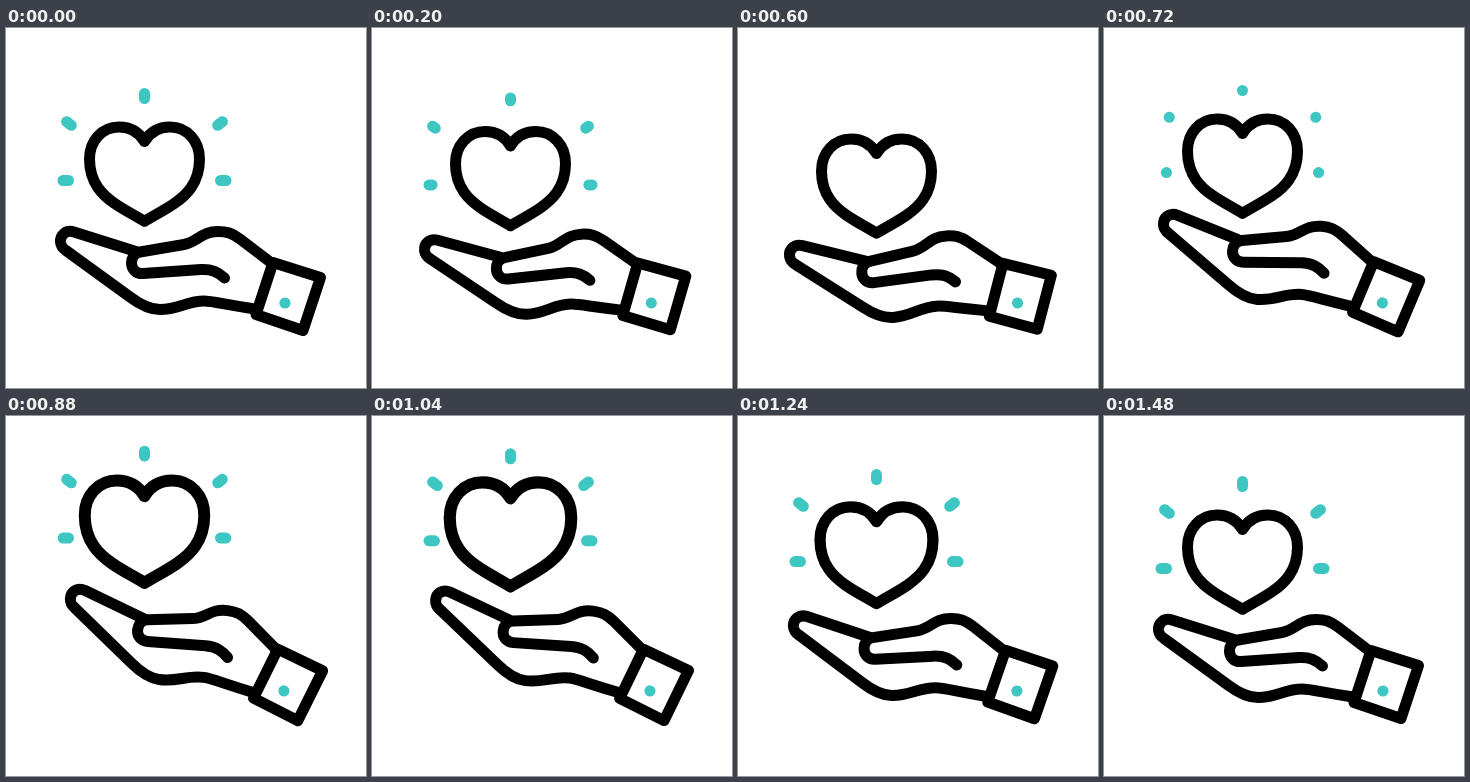
Animation, 360 px wide and 360 px high, one loop 1.52 s. Source, as an HTML page:

```html
<!DOCTYPE html>
<html lang="en">
<head>
<meta charset="utf-8">
<title>Caring hand</title>
<style>
  html, body { margin: 0; width: 100%; height: 100%; overflow: hidden; background: #fff; }
  svg { display: block; width: 100%; height: 100%; }
  .ink, .ray { fill: none; stroke-width: 11; stroke-linecap: round; stroke-linejoin: round; }
  .ink { stroke: #000; }
  .ray { stroke: #3ec6c3; }
</style>
</head>
<body>
<svg viewBox="0 0 360 360">
  <g id="hand">
    <path class="ink" d="M265.5 235 L234 211 C226 205 221 203.5 212 203.5 C195 203.5 192 214 178 216.5
      L134 224 C128 225 125.5 230 125.5 235 C125.5 241 130 246 137 245.5
      L195 241.5 C206 241 212 244 218.5 250"/>
    <path class="ink" d="M130 223.5 L68 204 C60 201.5 54 207 54.5 214 C55 219 57 220.5 60 222.5
      L124 269 C134 276.5 143 281.5 154 281.5 C172 281.5 181 273 198 273 C206 273 214 275.5 249 281"/>
    <path class="ink" d="M267 234.5 L314.5 249.5 L297 302.5 L250 286.5 Z"/>
    <circle cx="279" cy="275" r="5.6" fill="#3ec6c3"/>
  </g>
  <g id="lift">
    <path id="heart" class="ink" d="M138.5 113.5 C133 104 124 99 113 99 C96 99 83.5 113 83.5 131
      C83.5 156 98 168 108 175 C118 182 130 188 138.5 193.3
      C147 188 159 182 169 175 C179 168 193.5 156 193.5 131
      C193.5 113 181 99 164 99 C153 99 144 104 138.5 113.5 Z"/>
    <g id="rays"></g>
  </g>
</svg>
<script>
const LOOP = 1520, STEP = 40, MID = 138.5;
const $ = id => document.getElementById(id);
const hand = $('hand'), lift = $('lift'), heart = $('heart'), rays = $('rays');

// inner x, y, outer x, y; the side rays are mirrored around MID
const left = [[62.5, 152.5, 57, 152.5], [65.3, 97.3, 60.6, 93.7]];
const lines = [
  [MID, 70.5, MID, 65.5],
  ...left,
  ...left.map(([a, b, c, d]) => [2 * MID - a, b, 2 * MID - c, d])
].map(pts => {
  const el = document.createElementNS('http://www.w3.org/2000/svg', 'path');
  el.setAttribute('class', 'ray');
  rays.appendChild(el);
  return { el, pts };
});

// smooth 0..1 between two times
function ease(t, from, to) {
  const p = Math.min(1, Math.max(0, (t - from) / (to - from)));
  return (1 - Math.cos(Math.PI * p)) / 2;
}

// value that starts at 0 and eases through [from, to, value] stages
function track(t, stages) {
  let v = 0;
  for (const [from, to, end] of stages) v += (end - v) * ease(t, from, to);
  return v;
}

function render(t) {
  const angle = track(t, [[40, 410, -5.6], [529, 819, 8.2], [990, 1310, 0]]);
  const dy = track(t, [[40, 450, 13.5], [560, 885, -30.5], [960, 1370, 0]]);
  const size = 1 + track(t, [[720, 960, 0.115], [960, 1370, 0]]);
  hand.setAttribute('transform', `rotate(${angle} 279 267)`);
  lift.setAttribute('transform', `translate(0 ${dy})`);
  heart.setAttribute('transform',
    `translate(${MID} 146.5) scale(${size}) translate(${-MID} -146.5)`);

  // rays shrink outwards, vanish, then grow from the inner end
  const gone = t < 700;
  const a = gone ? ease(t, 40, 390) : 0;
  const b = gone ? 1 : ease(t, 700, 900);
  rays.style.display = a < b ? '' : 'none';
  for (const { el, pts: [x, y, u, v] } of lines) {
    const at = p => `${x + (u - x) * p} ${y + (v - y) * p}`;
    el.setAttribute('d', `M${at(a)} L${at(b)}`);
  }
}

const start = performance.now();
function tick() {
  const t = (performance.now() - start) % LOOP;
  render(Math.floor(t / STEP) * STEP);
  requestAnimationFrame(tick);
}
tick();
</script>
</body>
</html>
```
